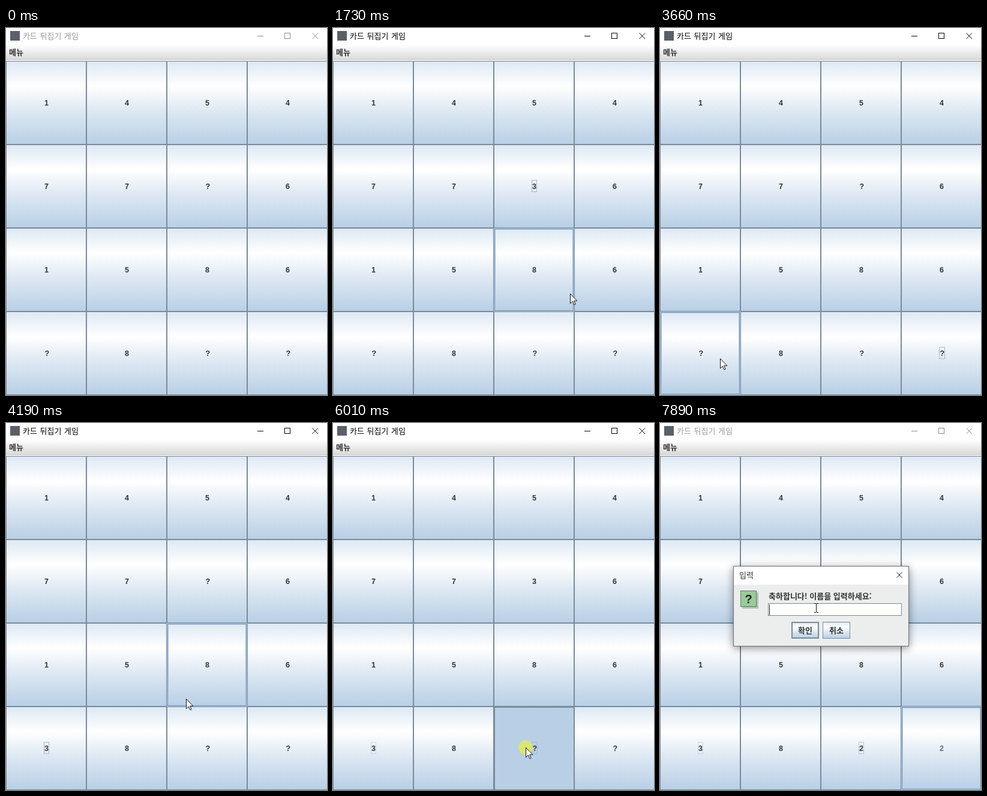
Write an HTML page that moves like this. It is 535 by 611 pixels and loops after 8 s.

```html
<!DOCTYPE html>
<html lang="ko">
<head>
<meta charset="utf-8">
<style>
html, body { margin: 0; width: 100%; height: 100%; overflow: hidden; background: #fff; }
svg { display: block; position: absolute; left: 0; top: 0; }
text { font-family: "Noto Sans CJK KR", "Noto Sans CJK JP", "Noto Sans CJK", sans-serif; font-size: 13px; fill: #333; }
.bold { font-weight: 700; }
.face { font: 700 12.5px "Liberation Sans", Arial, sans-serif; text-anchor: middle; }
.line { fill: none; shape-rendering: crispEdges; }
#dialog { transform-origin: 268px 305px; filter: drop-shadow(0 3px 7px rgba(0,0,0,.45)); }
</style>
</head>
<body>
<svg id="stage" width="535" height="611" viewBox="0 0 535 611">
  <defs>
    <linearGradient id="ocean" x2="0" y2="1">
      <stop offset="0" stop-color="#dde8f3"/><stop offset=".3" stop-color="#fff"/>
      <stop offset=".6" stop-color="#dde8f3"/><stop offset="1" stop-color="#b8cfe5"/>
    </linearGradient>
    <linearGradient id="bar" x2="0" y2="1">
      <stop offset="0" stop-color="#fff"/><stop offset="1" stop-color="#dadada"/>
    </linearGradient>
  </defs>
  <rect width="535" height="611" fill="#fff"/>
  <rect x="7" y="5" width="16" height="16" fill="#5a6068"/>
  <text id="title" x="28" y="17.5" word-spacing="1">카드 뒤집기 게임</text>
  <g id="controls" fill="none">
    <path class="line" d="M419 13.5h10M464.5 8.5h9v9h-9z"/>
    <path d="M510.5 8.5l9.5 9.5M520 8.5l-9.5 9.5"/>
  </g>
  <rect y="28" width="535" height="24" fill="url(#bar)"/>
  <rect y="52" width="535" height="1" fill="#ccc"/>
  <rect y="53" width="535" height="2" fill="#eee"/>
  <text class="bold" x="5" y="45">메뉴</text>
  <g id="cards"></g>
  <g id="dialog">
    <rect x="122.5" y="238.5" width="292" height="133" fill="#eceeed" stroke="#6b7276"/>
    <rect x="123" y="239" width="291" height="30" fill="#fff"/>
    <text x="132" y="258">입력</text>
    <path d="M394.5 248.5l9 9M403.5 248.5l-9 9" stroke="#222" fill="none"/>
    <rect x="137" y="282" width="27" height="27" fill="#b9bdbb"/>
    <rect x="134.5" y="279.5" width="26" height="26" fill="#99cc99" stroke="#5b7a68"/>
    <text x="147.5" y="299.5" style="font:700 20px 'Liberation Sans',Arial,sans-serif;text-anchor:middle;fill:#222">?</text>
    <text class="bold" x="181" y="293">축하합니다! 이름을 입력하세요:</text>
    <rect x="180.5" y="300.5" width="222" height="20" fill="#fff" stroke="#7a8a99"/>
    <rect id="caret" x="182" y="302" width="1" height="18" fill="#222"/>
    <rect x="220" y="332" width="44" height="26" fill="url(#ocean)" stroke="#7a8a99" stroke-width="2"/>
    <rect x="271.5" y="331.5" width="45" height="27" fill="url(#ocean)" stroke="#7a8a99"/>
    <text class="bold" x="242" y="350" text-anchor="middle">확인</text>
    <text class="bold" x="294" y="350" text-anchor="middle">취소</text>
  </g>
  <circle id="click" r="12" fill="#e6ea50" fill-opacity=".75"/>
  <path id="arrow" d="M.5 .5v16.2l3.8-3.6 2.7 5.7 2.2-1-2.6-5.6h5.2z" fill="#fff" stroke="#111"/>
  <path id="beam" class="line" d="M-3 -7.5h3M1 -7.5h3M.5 -7v14M-3 7.5h3M1 7.5h3" stroke="#111"/>
</svg>
<script>
const LOOP = 8000, OPEN = 6950;
const $ = id => document.getElementById(id);
const START_FACES = "1454" + "77?6" + "1586" + "?8??";

// time, card, face
const FLIPS = [
  [1600, 6, "3"], [2390, 15, "2"], [2530, 6, "?"], [2530, 15, "?"],
  [3860, 12, "3"], [4740, 6, "3"], [6080, 14, "2"], [6620, 15, "2"]
];
// down, up, card
const PRESSES = [
  [1530, 1600, 6], [2260, 2390, 15], [3790, 3860, 12],
  [4670, 4740, 6], [6010, 6080, 14], [6490, 6620, 15]
];
// first step, last step, step count, destination x, y
const ENTRY = [530, 608];
const MOVES = [
  [180, 590, 7, 352, 295], [810, 1260, 6, 341, 270],
  [1660, 1730, 2, 395, 442], [1800, 1920, 3, 468, 556],
  [2530, 3330, 13, 90, 556], [3530, 3660, 3, 100, 550],
  [3930, 4330, 7, 430, 400], [4400, 4470, 2, 322, 257],
  [4950, 5410, 8, 318, 526], [5610, 5740, 3, 321, 540],
  [6150, 6290, 3, 450, 530], [6950, 7020, 2, 381, 471],
  [7090, 7280, 4, 257, 304], [7550, 7620, 2, 260, 308]
];
// time, opacity, scale
const FADE = [[OPEN, .45, .96], [7020, .85, .99], [7090, 1, 1]];

function add(parent, tag, attrs) {
  const el = document.createElementNS("http://www.w3.org/2000/svg", tag);
  for (const k in attrs) el.setAttribute(k, attrs[k]);
  return parent.appendChild(el);
}
const show = (el, on) => { el.style.display = on ? "" : "none"; };
const place = (el, x, y) => el.setAttribute("transform", `translate(${x} ${y})`);

function makeCard(i) {
  const g = add($("cards"), "g", {});
  place(g, i % 4 * 134, 55 + (i >> 2) * 139);
  const frame = (parent, d, stroke) => add(parent, "rect", {
    x: d + .5, y: d + .5, width: 133 - 2 * d, height: 138 - 2 * d, stroke, class: "line"
  });
  const fill = add(g, "rect", { width: 134, height: 139 });
  frame(g, 0, "#7a8a99");
  const hover = add(g, "g", {});
  ["#b8cfe5", "#6f8cae", "#b8cfe5"].forEach((c, d) => frame(hover, d, c));
  const down = add(g, "path", { d: "M1 138V1.5H133M1.5 1V138", stroke: "#7a8a99", class: "line" });
  const focus = add(g, "rect", { x: 63.5, y: 59.5, height: 19, stroke: "#a3b8cc", class: "line" });
  const face = add(g, "text", { class: "face", y: 74 });
  return { fill, hover, down, focus, face };
}
const cards = [...START_FACES].map((_, i) => makeCard(i));

function pointer(t) {
  let [x, y] = ENTRY;
  for (const [a, b, n, tx, ty] of MOVES) {
    if (t < a) break;
    const k = Math.min(n, Math.floor((t - a) / ((b - a) / (n - 1)) + 1e-6) + 1);
    const p = k / n, e = p * p * (3 - 2 * p);
    x += (tx - x) * e;
    y += (ty - y) * e;
  }
  return [Math.round(x), Math.round(y)];
}

function draw(t) {
  const [x, y] = pointer(t);
  const open = t >= OPEN, active = t >= 1530 && !open, inside = t >= 180;
  const faces = [...START_FACES];
  for (const [at, i, f] of FLIPS) if (t >= at) faces[i] = f;
  const press = PRESSES.find(([a, b]) => t >= a && t < b);
  const last = PRESSES.filter(([a]) => t >= a).pop();
  const focused = last && !open ? last[2] : -1;
  let over = -1;
  if (open) over = 15;
  else if (inside && y >= 55) over = Math.floor((y - 55) / 139) * 4 + Math.floor(x / 134);

  cards.forEach((c, i) => {
    const pressed = !!press && press[2] === i;
    const ghost = i === 12 && t >= 4670 || i === 14 && t >= 6490;
    const ask = faces[i] === "?";
    c.fill.setAttribute("fill", pressed ? "#b8cfe5" : "url(#ocean)");
    show(c.hover, over === i && !pressed);
    show(c.down, pressed);
    show(c.focus, focused === i || ghost);
    c.focus.setAttribute("width", ask ? 9 : 8);
    c.focus.setAttribute("stroke-opacity", focused === i ? 1 : i === 12 ? .4 : .75);
    c.face.textContent = faces[i];
    c.face.setAttribute("x", ask ? 68.2 : 67.5);
    c.face.style.fill = i === 15 && open ? "#5c6b8a" : "#333";
  });

  $("title").style.fill = active ? "#000" : "#999";
  $("controls").setAttribute("stroke", active ? "#000" : "#8a8a8a");

  show($("dialog"), open);
  if (open) {
    const [, alpha, scale] = FADE.filter(f => t >= f[0]).pop();
    $("dialog").style.opacity = alpha;
    $("dialog").style.transform = scale < 1 ? `scale(${scale})` : "none";
    show($("caret"), t < 7350 || t >= 7890);
  }

  const typing = open && x > 180 && x < 403 && y > 300 && y < 321;
  show($("arrow"), inside && !typing);
  show($("beam"), typing);
  show($("click"), !!press);
  for (const id of ["arrow", "beam", "click"]) place($(id), x, y);
}

const t0 = performance.now();
function tick() {
  draw((performance.now() - t0) % LOOP);
  requestAnimationFrame(tick);
}
tick();
</script>
</body>
</html>
```
